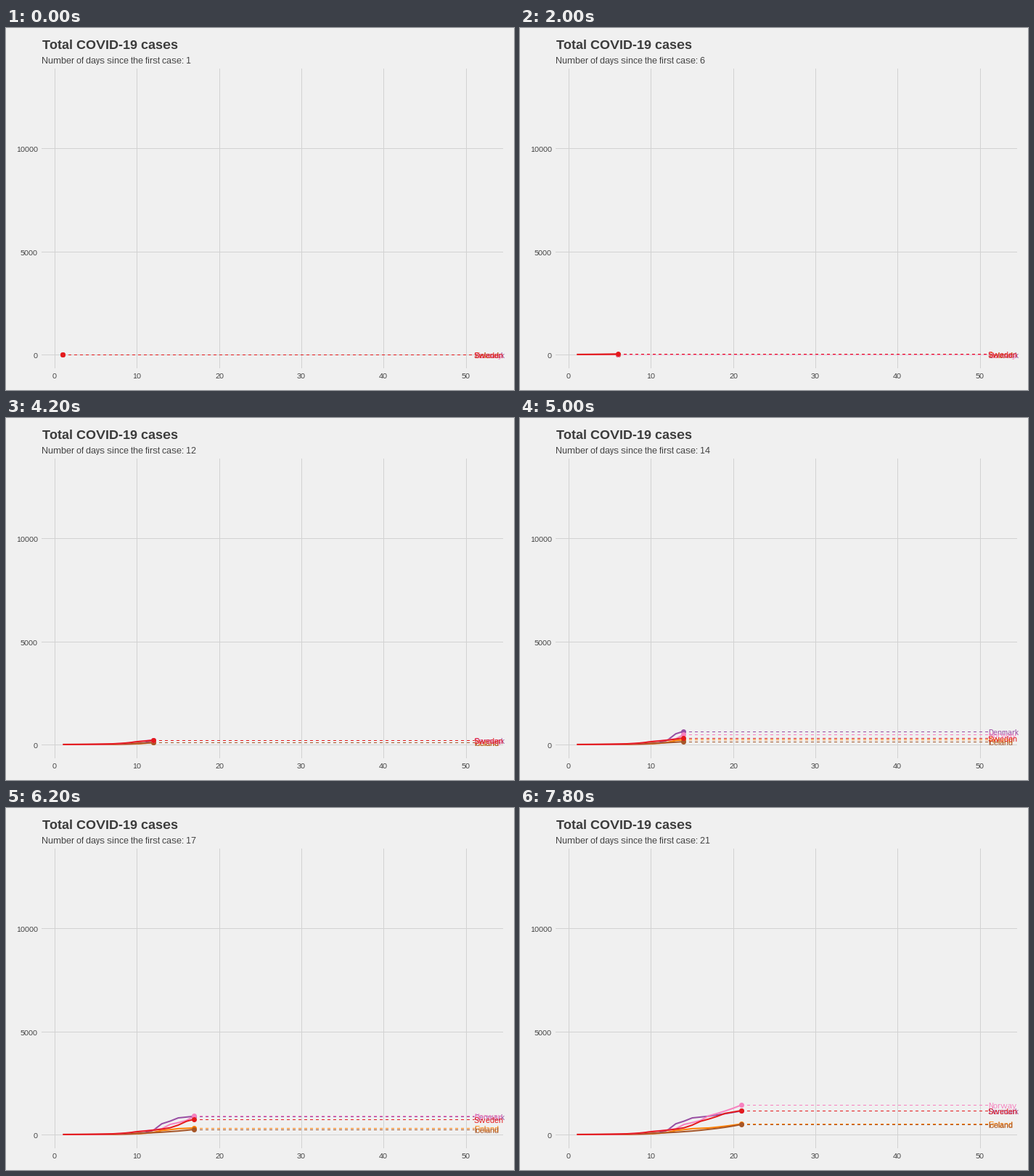
Write a matplotlib script that moves like this. It is 700 px wide and 500 px high and loops after 8 s.

```python
import numpy as np
import matplotlib.pyplot as plt
from matplotlib.animation import FuncAnimation

plt.rcParams["font.family"] = "Liberation Sans"
plt.rcParams["text.hinting"] = "default"
plt.rcParams["text.hinting_factor"] = 1

W, H, DPI = 700, 500, 100
PX = 72 / DPI                      # points per pixel
FRAMES, INTERVAL = 40, 200
SPAN, STEPS = 51, 99               # days and frame steps of the full reveal
BG, GRID, INK = "#F0F0F0", "#D2D2D2", "#3C3C3C"
LABEL_DAY = 51

# name: colour, case count on a few key days
COUNTRIES = {
    "Denmark": ("#984EA3", {1: 1, 10: 35, 12: 212, 13: 520, 15: 805, 17: 890, 21: 1145}),
    "Finland": ("#FF7F00", {1: 1, 11: 59, 13: 195, 15: 285, 17: 318, 21: 515}),
    "Iceland": ("#A65628", {1: 1, 10: 58, 14: 140, 17: 250, 21: 490}),
    "Norway": ("#F781BF", {1: 1, 10: 147, 13: 277, 14: 489, 16: 680, 17: 907, 21: 1433}),
    "Sweden": ("#E41A1C", {1: 2, 10: 137, 14: 326, 16: 640, 19: 1025, 21: 1165}),
}
DAYS = np.arange(1, 22)
KEYS = np.round((DAYS - 1) * STEPS / SPAN)   # frame on which each day is reached


def px(day):
    return 67.2 + 11.34 * day


def py(cases):
    return 451.5 - 0.0285 * cases


def mid(v):
    """Centre of the pixel that holds v."""
    return np.floor(v) + 0.5


def daily(points):
    """Daily counts, growing exponentially between the key days."""
    return np.exp(np.interp(DAYS, list(points), np.log(list(points.values()))))


fig = plt.figure(figsize=(W / DPI, H / DPI), dpi=DPI, facecolor=BG)
ax = fig.add_axes([0, 0, 1, 1])
ax.set_xlim(0, W)
ax.set_ylim(H, 0)
ax.axis("off")


def text(x, y, s, size, color=INK, **kw):
    return ax.text(x, y, s, fontsize=size * PX + 0.01, color=color,
                   va="baseline", **kw)


def line(x, y, color, width=1, **kw):
    return ax.plot(x, y, color=color, lw=width * PX, snap=False,
                   solid_capstyle="butt", **kw)[0]


for cases in (0, 5000, 10000):
    y = mid(py(cases))
    line([49, 685], [y, y], GRID, zorder=1)
    text(44, y + 4.5, str(cases), 10, ha="right")
for day in range(0, 51, 10):
    x = mid(px(day))
    line([x, x], [56, 470], GRID, zorder=1)
    text(x - 0.5, 484, str(day), 10, ha="center")

text(50, 29, "Total COVID-19 cases", 18, weight="bold")
subtitle = text(49, 49, "", 12)

tracks = []
for name, (color, points) in COUNTRIES.items():
    trail = line([], [], color, 2, zorder=2)
    leader = line([], [], color, zorder=3, dashes=(4, 4))
    dot = ax.add_patch(plt.Circle((0, 0), 3.5, color=color, lw=0, zorder=4))
    label = text(645, 0, name, 11, color, zorder=5)
    tracks.append((daily(points), trail, leader, dot, label))


def update(k):
    now = np.interp(k, KEYS, DAYS)
    subtitle.set_text("Number of days since the first case: "
                      f"{round(1 + k * SPAN / STEPS)}")
    past = DAYS[DAYS < now]
    for cases, trail, leader, dot, label in tracks:
        x, y = px(now), py(np.interp(now, DAYS, cases))
        trail.set_data(np.append(px(past), x),
                       np.append(py(cases[:len(past)]), y) - 0.5)
        leader.set_data([np.floor(x), px(LABEL_DAY)], [mid(y), mid(y)])
        dot.set_center((mid(x), mid(y)))
        label.set_y(np.floor(y) + 5)
    return []


anim = FuncAnimation(fig, update, frames=FRAMES, interval=INTERVAL,
                     repeat=True, repeat_delay=0, blit=False)
plt.show()
```
